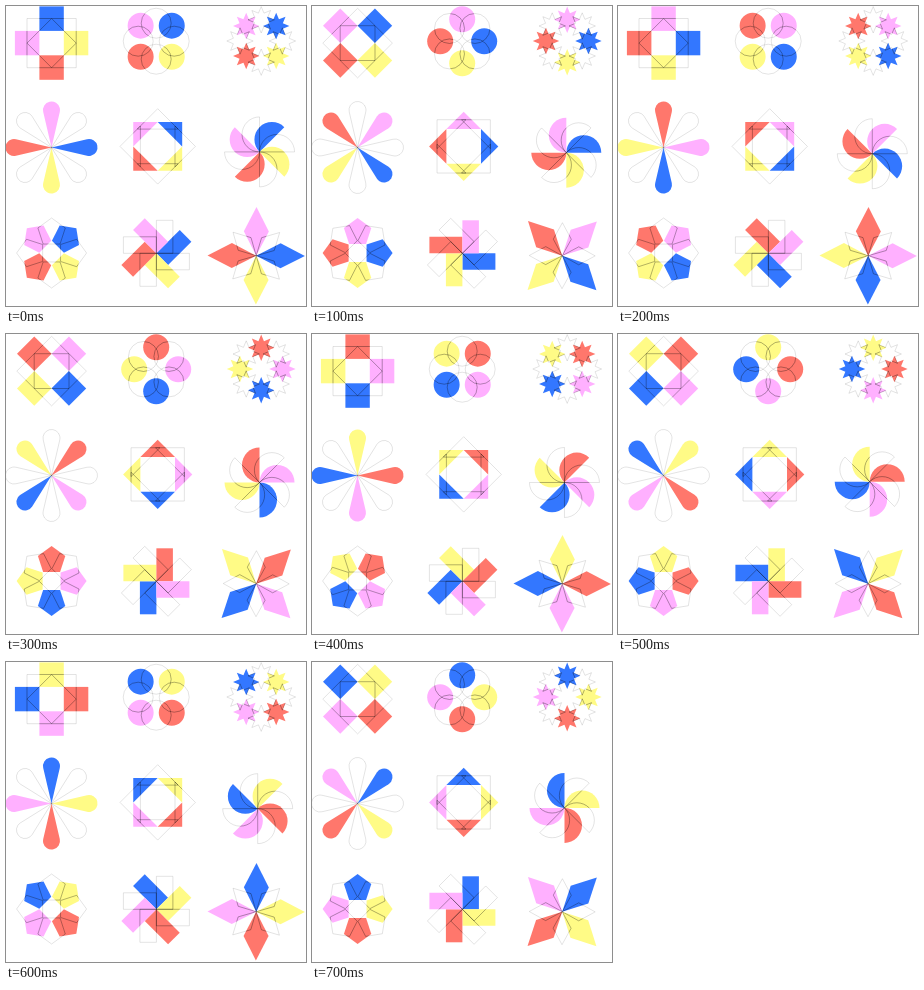
Write an HTML page with a canvas that moves like this. It is 300 by 300 pixels and loops after 800 ms.

```html
<!DOCTYPE html>
<html lang="en">
<head>
<meta charset="utf-8">
<title>Turning shapes</title>
<style>
  html, body { margin: 0; width: 100%; height: 100%; overflow: hidden; background: #fff; }
  canvas { display: block; width: 300px; height: 300px; }
</style>
</head>
<body>
<canvas id="stage"></canvas>
<script>
const STAGE = 300, STEP_MS = 100, STEPS = 8;
const TURN = Math.PI / 4;
const COLORS = ['#3377ff', '#fffb86', '#ff776c', '#ffb0ff'];

const canvas = document.getElementById('stage');
const ctx = canvas.getContext('2d');
const dpr = window.devicePixelRatio || 1;
canvas.width = canvas.height = STAGE * dpr;

// Every path points up from the centre of its group.
function poly(...points) {
  const path = new Path2D();
  points.forEach(([x, y]) => path.lineTo(x, y));
  path.closePath();
  return path;
}

function radial(count, y, radius) {
  return poly(...Array.from({ length: count }, (_, i) => {
    const a = i * 2 * Math.PI / count, r = radius(i);
    return [r * Math.sin(a), y - r * Math.cos(a)];
  }));
}

function disc(y, r) {
  const path = new Path2D();
  path.arc(0, y, r, 0, 2 * Math.PI);
  return path;
}

function drop(y, r) {
  const path = new Path2D();
  const a = Math.asin(r / -y);
  path.moveTo(0, 0);
  path.arc(0, y, r, Math.PI - a, a);
  path.closePath();
  return path;
}

function half(r) {
  const path = new Path2D();
  path.arc(0, -r, r, Math.PI / 2, Math.PI * 1.5);
  path.closePath();
  return path;
}

const corner = (base, tip) => poly([0, -tip], [tip - base, -base], [base - tip, -base]);
const rhomb = (w, h) => poly([0, 0], [w, -h / 2], [0, -h], [-w, -h / 2]);

// start: slot of the first colour; ghost: path of the empty slots; tilt: in radians
const groups = [
  { x: 45.6, y: 37.1, start: 0, path: poly([-12.2, -36.7], [12.2, -36.7], [12.2, -12.2], [-12.2, -12.2]), ghost: corner(17.4, 34.8) },
  { x: 150.2, y: 35.2, start: 1, path: disc(-22, 13), ghost: disc(-18, 15) },
  { x: 255.2, y: 35, start: 1, path: radial(16, -21.2, i => i % 2 ? 7.2 : 13.2) },
  { x: 45.5, y: 141.5, start: 2, path: drop(-37.5, 8.5) },
  { x: 151.7, y: 140.4, start: 1, path: corner(17.3, 34.6), ghost: corner(17.3, 37.7) },
  { x: 253, y: 147.2, start: 1, path: half(17.5), drift: 1.4 },
  { x: 45.6, y: 247, start: 1, path: radial(5, -20.6, () => 14.4) },
  { x: 150.4, y: 247.3, start: 1, path: poly([0, 0], [0, -33], [16.5, -33], [16.5, 0]) },
  { x: 250.2, y: 249.7, start: 2, path: rhomb(12.5, 48.7), ghost: rhomb(9, 33), tilt: 0.006 }
];

function atSlot(slot, draw) {
  ctx.save();
  ctx.rotate(slot * TURN);
  draw();
  ctx.restore();
}

function drawGhosts(group, first, color) {
  ctx.strokeStyle = color;
  for (let i = 0; i < 4; i++) {
    atSlot(first + 1 + i * 2, () => ctx.stroke(group.ghost || group.path));
  }
}

function drawGroup(group, step) {
  const first = group.start + step;
  const angle = step * TURN + 0.4, drift = group.drift || 0;
  ctx.save();
  ctx.translate(group.x + drift * Math.sin(angle), group.y - drift * Math.cos(angle));
  ctx.rotate(group.tilt || 0);
  ctx.lineWidth = 0.5;
  drawGhosts(group, first, 'rgba(0,0,0,0.22)');

  const filled = new Path2D();
  COLORS.forEach((color, i) => {
    const slot = first + i * 2;
    ctx.fillStyle = color;
    atSlot(slot, () => ctx.fill(group.path));
    filled.addPath(group.path, new DOMMatrix().rotate(slot * 45));
  });

  // Empty slots show darker where they cross a colour.
  ctx.clip(filled);
  drawGhosts(group, first, 'rgba(0,0,0,0.6)');
  ctx.restore();
}

function render(time) {
  const step = Math.floor(time / STEP_MS) % STEPS;
  ctx.setTransform(dpr, 0, 0, dpr, 0, 0);
  ctx.fillStyle = '#fff';
  ctx.fillRect(0, 0, STAGE, STAGE);
  groups.forEach(group => drawGroup(group, step));
}

const begin = performance.now();
function tick() {
  render(performance.now() - begin);
  requestAnimationFrame(tick);
}
tick();
</script>
</body>
</html>
```
